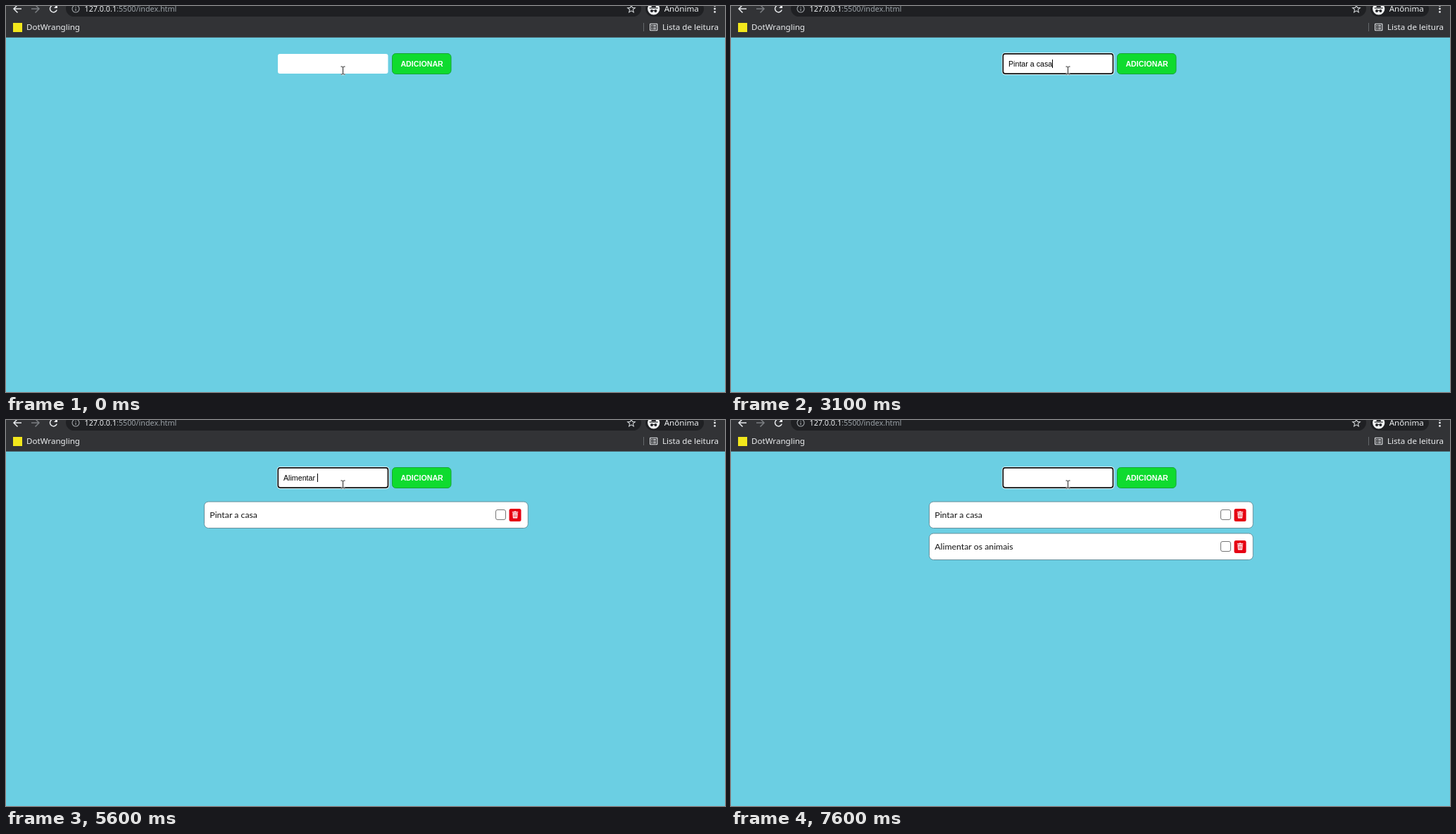
Recreate the animation shown at these times as an HTML page. Size 1021 by 548 pixels, loop 8000 ms.

```html
<!DOCTYPE html>
<html lang="pt-BR">
<head>
<meta charset="utf-8">
<title>Lista de tarefas</title>
<style>
  html, body { margin: 0; width: 100%; height: 100%; overflow: hidden; background: #6bcfe3; }
  svg { position: absolute; left: 0; top: 0; display: block; }
  text { white-space: pre; }
  .ui { font: 11.6px "Noto Sans", "Open Sans", sans-serif; fill: #eceef0; }
  .url { font-size: 10.75px; }
  .button { font: bold 10.67px "Liberation Sans", Arial, sans-serif; fill: #fff; text-anchor: middle; }
  .task { font: 12.3px Lato, "Open Sans", sans-serif; fill: #151515; }
  .line { fill: none; stroke: #e8eaed; stroke-width: 1.5; }
  .hidden { visibility: hidden; }
  #typed {
    position: absolute; left: 394px; top: 76px; height: 12px;
    display: flex; white-space: pre; color: #000;
    font: 10.67px/12px "Liberation Sans", Arial, sans-serif;
  }
  #typed.caret::after { content: ""; width: 1px; height: 12px; background: #000; }
</style>
</head>
<body>
<svg width="1021" height="548" viewBox="0 0 1021 548">
  <rect width="1021" height="548" fill="#6bcfe3"/>

  <!-- browser bars -->
  <rect width="1021" height="44" fill="#323336"/>
  <rect y="44" width="1021" height="1" fill="#48616a"/>
  <rect x="85" y="-8" width="817" height="23" rx="11.5" fill="#1f2023"/>
  <rect x="908" y="-7" width="83" height="22" rx="11" fill="#1f2023"/>
  <path class="line" d="M22 4H11.5M16.5 -1.5L11 4L16.5 9.5"/>
  <path class="line" style="stroke:#7c7f83" d="M36 4H46.5M41.5 -1.5L47 4L41.5 9.5"/>
  <path class="line" d="M71.3 .6A5 5 0 1 0 72.2 5.6"/>
  <path fill="#e8eaed" d="M73 -2V3H68Z"/>
  <g class="line" style="stroke:#a4a8ac;stroke-width:1.1">
    <circle cx="99" cy="4" r="5"/>
    <path d="M99 3.4V7M99 1V2.3"/>
  </g>
  <text class="ui url" x="111.5" y="8">127.0.0.1<tspan fill="#9aa0a6">:5500/index.html</tspan></text>
  <path id="star" class="line" style="stroke:#cfd2d5;stroke-width:1.1"/>
  <circle cx="919.7" cy="4" r="8.6" fill="#f1f3f4"/>
  <g fill="#25262a">
    <path d="M916.3 2L917.4 -1.7H922L923.1 2Z"/>
    <rect x="913.7" y="2.4" width="12" height="1.2"/>
    <circle cx="917" cy="7" r="2"/>
    <circle cx="922.4" cy="7" r="2"/>
    <rect x="918" y="6" width="3.4" height="1"/>
  </g>
  <text class="ui" x="934.7" y="8">Anônima</text>
  <g fill="#e8eaed">
    <circle cx="1006.5" cy="-.4" r="1.4"/>
    <circle cx="1006.5" cy="4" r="1.4"/>
    <circle cx="1006.5" cy="8.4" r="1.4"/>
  </g>
  <rect x="10" y="24" width="13" height="13" fill="#f2e71c"/>
  <text class="ui" x="29" y="34">DotWrangling</text>
  <rect x="905" y="24" width="1" height="12" fill="#65686c"/>
  <g class="line" style="stroke-width:1.1">
    <rect x="914.6" y="25.2" width="10.2" height="9.6" rx=".6"/>
    <path d="M916.4 27.6H918M919 27.6H923M916.4 30H918M919 30H923M916.4 32.4H918M919 32.4H923"/>
  </g>
  <text class="ui" x="932" y="34">Lista de leitura</text>

  <!-- form -->
  <rect x="386" y="68" width="156.5" height="28" rx="3" fill="#fff"/>
  <g id="focus">
    <rect x="384.7" y="66.2" width="159.6" height="31.6" rx="4.5" fill="#fff"/>
    <rect x="386.3" y="67.9" width="156.2" height="28.2" rx="3" fill="#fff" stroke="#101010" stroke-width="1.7"/>
  </g>
  <rect x="548.5" y="67.5" width="83.5" height="29" rx="5" fill="#0fdb2f" stroke="#17a437"/>
  <text class="button" x="590.6" y="86">ADICIONAR</text>

  <g id="list"></g>
</svg>

<div id="typed"></div>

<!-- text pointer -->
<svg width="1021" height="548" viewBox="0 0 1021 548" fill="none">
  <path id="halo" stroke="#fff" stroke-width="2.6" stroke-opacity=".8" d="M475.5 86H477.5L478.5 87L479.5 86H481.5M478.5 87V96M475.5 97H477.5L478.5 96L479.5 97H481.5"/>
  <path id="beam" stroke="#222" stroke-width="1"/>
</svg>

<script>
  const LOOP = 8000;
  const ICON_LOADED = 3700;
  // [time, typed characters]; a line break submits the form
  const KEYS = [
    [1300, 'P'], [1600, 'i'], [1800, 'n'], [1900, 't'], [2000, 'a'], [2100, 'r'], [2200, ' '],
    [2500, 'a '], [2700, 'c'], [2800, 'a'], [3000, 's'], [3100, 'a'], [3300, '\n'],
    [4400, 'A'], [4700, 'l'], [4800, 'i'], [5000, 'm'], [5100, 'e'], [5200, 'n'], [5300, 't'],
    [5400, 'a'], [5500, 'r'], [5600, ' '], [5800, 'o'], [5900, 's'], [6300, ' a'], [6400, 'n'],
    [6700, 'i'], [6800, 'm'], [6900, 'ai'], [7300, 's\n']
  ];
  const CARET_OFF = [[0, 500], [1100, 1300], [3700, 4300], [7600, LOOP]];

  const byId = id => document.getElementById(id);
  const typed = byId('typed'), focusRing = byId('focus');

  byId('beam').setAttribute('d', byId('halo').getAttribute('d'));

  const starPoints = Array.from({ length: 10 }, (_, i) => {
    const r = i % 2 ? 2.5 : 5.6, a = (i / 5 - 0.5) * Math.PI;
    return `${888 + r * Math.cos(a)} ${4.4 + r * Math.sin(a)}`;
  });
  byId('star').setAttribute('d', `M${starPoints.join('L')}Z`);

  const controls = (checkX, buttonX, icon) => `
    <g>
      <rect x="${checkX + 0.5}" y="127.5" width="14" height="14" rx="2.5" fill="#fff" stroke="#767676"/>
      <rect x="${buttonX}" y="126" width="${731.5 - buttonX}" height="18" rx="2.5" fill="#e60012"/>
      ${icon}
    </g>`;
  const trash = `
    <path fill="#fff" d="M718.8 130.3H721.3L722 129.5H724L724.7 130.3H727.2V131.5H718.8Z
      M719.4 132.2H726.6L726.1 139.5H719.9Z"/>
    <path stroke="#e60012" stroke-width=".7" d="M721.3 133.5V138.2M723 133.5V138.2M724.7 133.5V138.2"/>`;
  const card = (label, row) => `
    <g transform="translate(0 ${row * 45})">
      <rect x="281.5" y="116" width="459.8" height="37.5" rx="6" fill="#fff" stroke="#668f9b"/>
      <text class="task" x="289.3" y="139">${label}</text>
      ${controls(697, 717, '')}
      ${controls(695, 714.5, trash)}
    </g>`;

  byId('list').innerHTML = ['Pintar a casa', 'Alimentar os animais'].map(card).join('');
  const cards = [...byId('list').children];

  const show = (el, on) => el.classList.toggle('hidden', !on);

  function render(t) {
    const lines = KEYS.filter(([at]) => at <= t).map(([, s]) => s).join('').split('\n');
    const text = lines[lines.length - 1];
    if (typed.textContent !== text) typed.textContent = text;
    typed.classList.toggle('caret', !CARET_OFF.some(([a, b]) => t >= a && t < b));
    show(focusRing, t >= 500);
    cards.forEach((el, i) => {
      const added = i < lines.length - 1;
      const [early, final] = el.querySelectorAll('g');
      el.style.display = added ? '' : 'none';
      show(early, t < ICON_LOADED);
      show(final, t >= ICON_LOADED);
    });
  }

  const start = performance.now();
  function tick() {
    render((performance.now() - start) % LOOP);
    requestAnimationFrame(tick);
  }
  tick();
</script>
</body>
</html>
```
